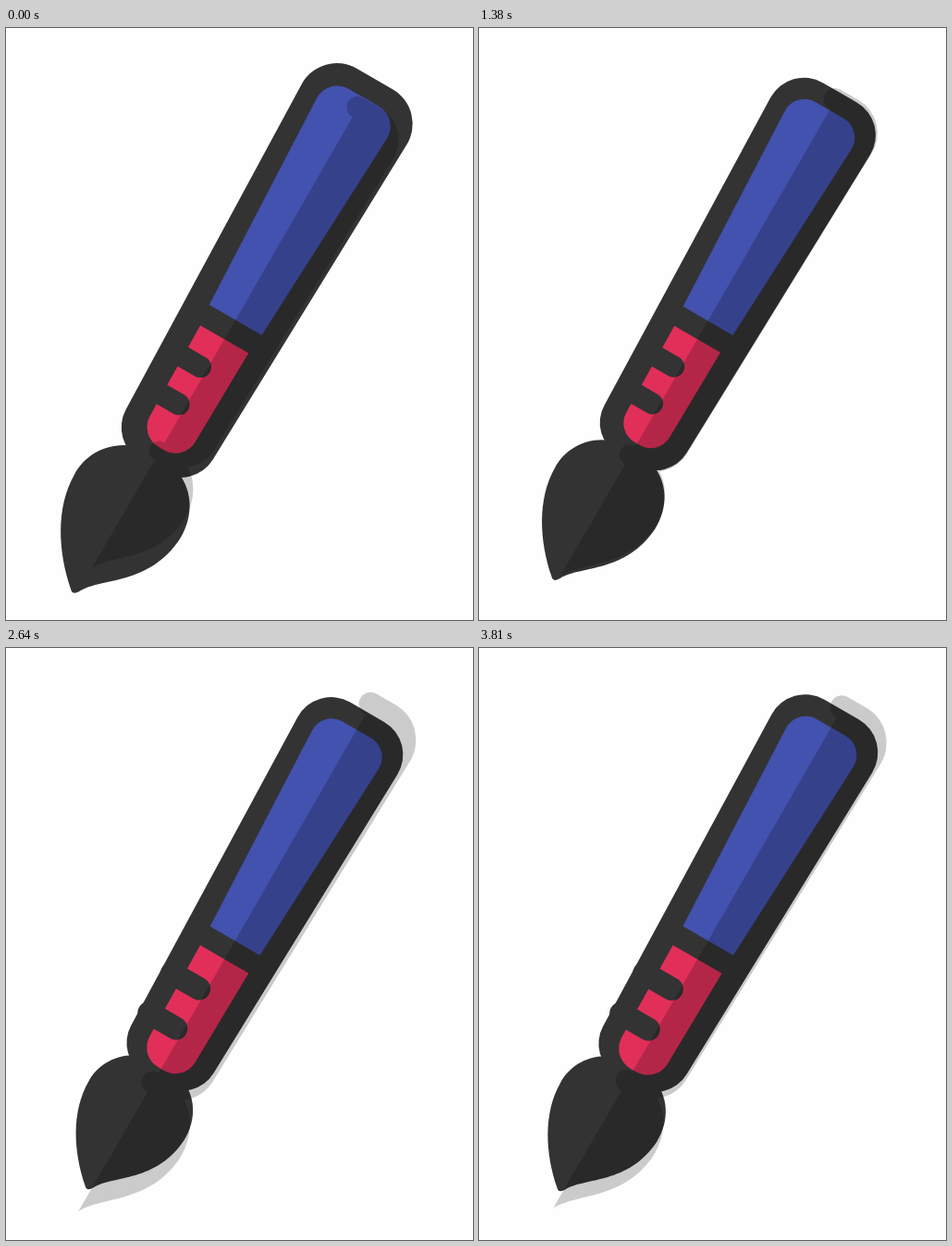
Animation of 505x640 px, one loop 3920 ms. Source, as an HTML page with a canvas:

```html
<!DOCTYPE html>
<html lang="en">
<head>
<meta charset="utf-8">
<title>Paintbrush</title>
<style>
  html, body { margin: 0; width: 100%; height: 100%; overflow: hidden; background: #fefefe; }
  canvas { display: block; width: 505px; height: 640px; }
</style>
</head>
<body>
<canvas id="stage"></canvas>
<script>
const WIDTH = 505, HEIGHT = 640, LOOP = 3920;
const CENTER = { x: 237, y: 335 };
const TILT = Math.PI / 6;
const DARK = '#333333', BLUE = '#4351af', RED = '#e12f59', SHADE = 'rgba(0,0,0,0.2)';

// Every part pulses alike, each one LAG later than the one before it.
const PERIOD = 1115, LAG = 136, DELAY = 30;
const SKIP = 210; // the pulse jumps ahead at mid-loop
const MIN_SCALE = 0.9;

const canvas = document.getElementById('stage');
const ctx = canvas.getContext('2d');
const ratio = window.devicePixelRatio || 1;
canvas.width = WIDTH * ratio;
canvas.height = HEIGHT * ratio;

// Soft turn at the smallest size, sharp turn at the largest.
function pulse(time) {
  const cycle = ((time / PERIOD) % 1 + 1) % 1;
  const rise = 1 - Math.abs(2 * cycle - 1);
  return MIN_SCALE + (1 - MIN_SCALE) * Math.pow(rise, 1.3);
}

// Symmetric trapezoid with separate corner radii at top and bottom.
function taper(top, topHalf, topRadius, bottom, bottomHalf, bottomRadius, color) {
  ctx.beginPath();
  ctx.moveTo(0, top);
  ctx.arcTo(topHalf, top, bottomHalf, bottom, topRadius);
  ctx.arcTo(bottomHalf, bottom, 0, bottom, bottomRadius);
  ctx.arcTo(-bottomHalf, bottom, -topHalf, top, bottomRadius);
  ctx.arcTo(-topHalf, top, 0, top, topRadius);
  ctx.closePath();
  ctx.fillStyle = color;
  ctx.fill();
}

function drawHandle() {
  taper(-322.3, 66.6, 43, 160, 53, 41, DARK);
  taper(-299, 44.8, 25, -22.3, 32.7, 0, BLUE);
}

function drawGrip() {
  taper(1.7, 30.5, 0, 140, 28.2, 25, RED);
}

function drawNotches() {
  ctx.strokeStyle = DARK;
  ctx.lineCap = 'round';
  ctx.lineWidth = 23.4;
  ctx.beginPath();
  for (const y of [40.4, 87]) {
    ctx.moveTo(-39, y);
    ctx.lineTo(-7.5, y);
  }
  ctx.stroke();
}

function drawBristle() {
  ctx.beginPath();
  ctx.moveTo(20, 148);
  ctx.bezierCurveTo(52, 156, 67, 184, 66, 212);
  ctx.bezierCurveTo(62, 272, 14, 290, 1, 314);
  ctx.quadraticCurveTo(-4, 323, -9, 317);
  ctx.bezierCurveTo(-40, 290, -67, 250, -67, 208);
  ctx.bezierCurveTo(-68, 184, -52, 156, -20, 148);
  ctx.closePath();
  ctx.fillStyle = DARK;
  ctx.fill();
}

// Right half of the whole brush, with a round cap at each end of the handle.
function drawShade() {
  ctx.beginPath();
  ctx.moveTo(0, -322);
  ctx.arcTo(66.6, -322, 53, 160, 43);
  ctx.arcTo(53, 160, 0, 160, 41);
  ctx.lineTo(0, 164);
  ctx.arc(-1, 152.5, 11.5, Math.PI / 2, Math.PI * 1.5);
  ctx.lineTo(0, 141);
  ctx.lineTo(0, -297);
  ctx.arc(-1, -309.5, 12.5, Math.PI / 2, Math.PI * 1.5);
  ctx.closePath();
  ctx.moveTo(0, 145);
  ctx.lineTo(20, 145);
  ctx.bezierCurveTo(51, 152, 65.4, 180, 64.4, 207);
  ctx.bezierCurveTo(60.5, 265.5, 13, 283, -0.5, 310);
  ctx.closePath();
  ctx.fillStyle = SHADE;
  ctx.fill();
}

// Painted in this order; order in the pulse and full size differ.
const PARTS = [
  { draw: drawHandle,  turn: 3, size: 1.031 },
  { draw: drawBristle, turn: 4, size: 1.008 },
  { draw: drawGrip,    turn: 2, size: 1.044 },
  { draw: drawNotches, turn: 1, size: 1.089 },
  { draw: drawShade,   turn: 0, size: 1.03 }
];

function render(now) {
  const t = now % LOOP;
  const time = t - DELAY + (t >= LOOP / 2 ? SKIP : 0);
  ctx.setTransform(ratio, 0, 0, ratio, 0, 0);
  ctx.fillStyle = '#fefefe';
  ctx.fillRect(0, 0, WIDTH, HEIGHT);
  for (const { draw, turn, size } of PARTS) {
    const scale = size * pulse(time - turn * LAG);
    ctx.save();
    ctx.translate(CENTER.x, CENTER.y);
    ctx.rotate(TILT);
    ctx.scale(scale, scale);
    draw();
    ctx.restore();
  }
}

const start = performance.now();
function loop() {
  render(Math.max(0, performance.now() - start));
  requestAnimationFrame(loop);
}
loop();
</script>
</body>
</html>
```
